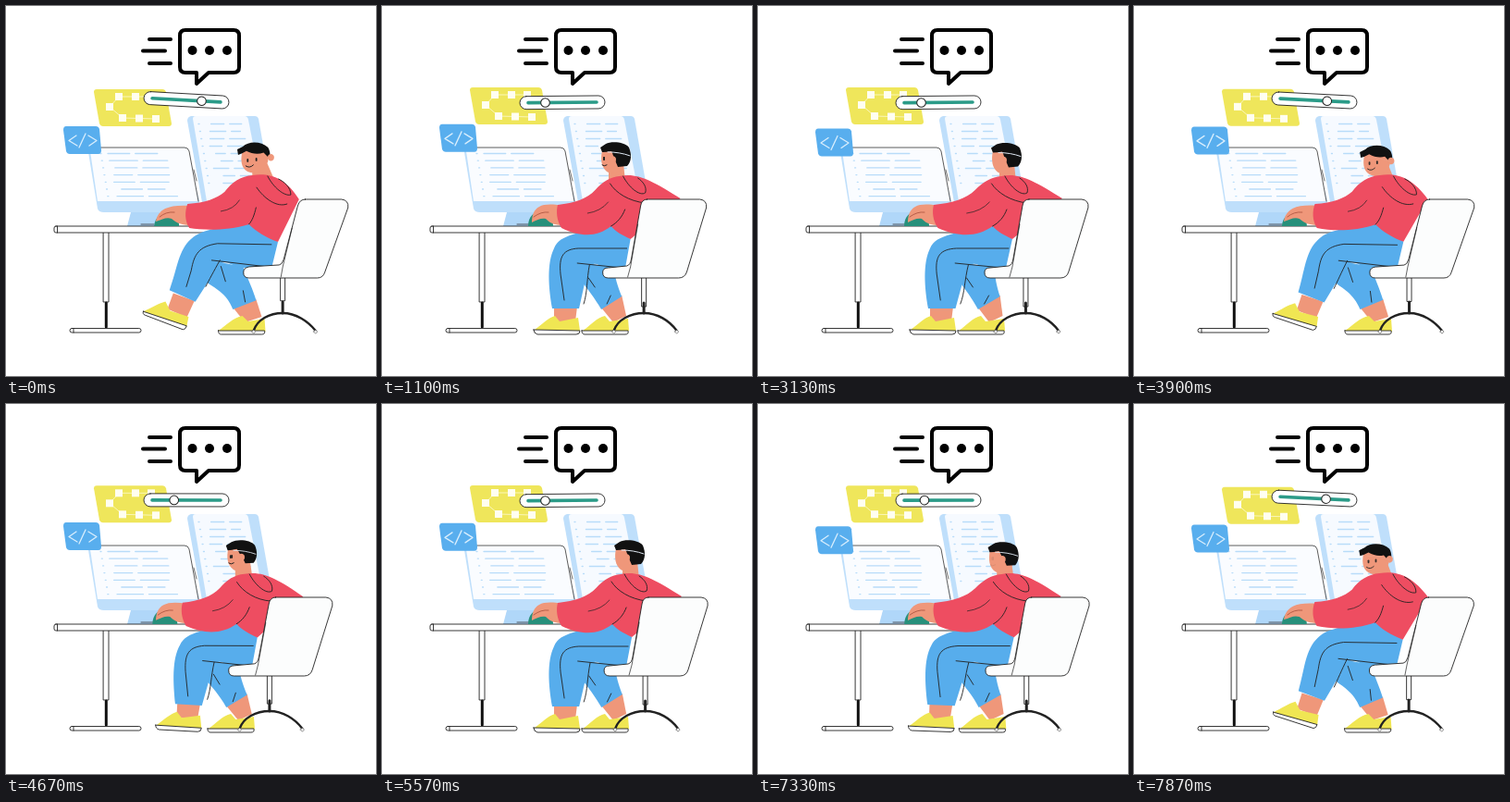
Recreate the animation shown at these times as an HTML page. Size 400 by 400 pixels, loop 7.91 s.

```html
<!DOCTYPE html>
<html lang="en">
<head>
<meta charset="utf-8">
<title>Coder at a desk</title>
<style>
html, body { margin: 0; width: 100%; height: 100%; overflow: hidden; background: #fff; }
svg { display: block; width: 100vw; height: 100vh; }
</style>
</head>
<body>
<svg id="stage" viewBox="0 0 400 400" fill="none" stroke-linecap="round" stroke-linejoin="round">
  <g stroke="#000" stroke-width="4">
    <path d="M155,36H178M148,48.500H172M155,62H178"/>
    <path d="M206,72H194Q188,72 188,66V32Q188,26 194,26H246Q252,26 252,32V66Q252,72 246,72H219L206,84Z"/>
    <g fill="#000" stroke="none"><circle cx="201.500" cy="48" r="5"/><circle cx="220" cy="48" r="5"/><circle cx="239" cy="48" r="5"/></g>
  </g>

  <g id="rightScreen">
    <path fill="#bfdffb" d="M200,119H269Q272,119 273,122L285,190L270,212H212L196,124Q196,120 200,119Z"/>
    <path fill="#f6faff" d="M202,122Q202,119 205,119H258Q261,119 262,123L275,190L270,211H217Z"/>
    <path stroke="#333" stroke-width=".7" d="M203,177L206,189"/>
  </g>
  <g id="leftScreen">
    <path fill="#bfdffb" d="M92,153H194L209,211Q210,223 204,223H106Q100,223 99,219L89,158Q89,154 92,153Z"/>
    <path fill="#fafcff" d="M92,153H193Q197,153 198,157L208,211H99L91,157Z"/>
    <path stroke="#333" stroke-width=".8" d="M93,153H193Q197,153 198,157L208,211"/>
    <path fill="#b0d7f9" d="M135,223H166L168,238H131Z"/>
    <path stroke="#333" stroke-width=".8" d="M146,236H160"/>
  </g>
  <g id="code" stroke="#b8dcf9" stroke-width="1.300"></g>

  <g id="flow">
    <path fill="#efe65b" d="M98,90H169Q172,90 173,93L179,127Q179,130 176,130H105Q102,130 101,127L95,93Q95,90 98,90Z"/>
    <path stroke="#fbf7b8" stroke-width="1" d="M157,98H122L112,109L126,121L162,122"/>
    <g id="nodes" fill="#fffef0"></g>
  </g>
  <g id="slider">
    <rect x="-46" y="-7" width="92" height="14" rx="7" fill="#fff" stroke="#222" stroke-width=".9"/>
    <path stroke="#2b9b88" stroke-width="3.600" d="M-37,0H37"/>
    <circle id="knob" r="4.800" fill="#fff" stroke="#222"/>
  </g>
  <g id="tag">
    <path fill="#58aeee" d="M65,130H97Q100,130 101,133L103,156Q103,160 100,160H69Q66,160 65,157L62,134Q62,130 65,130Z"/>
    <path stroke="#d9eefd" stroke-width="1.300" d="M76,140L68,145.500L77,151M86,138L79,153M89,140L98,145.500L90,151"/>
  </g>

  <g stroke="#222" stroke-width=".9" fill="#fff">
    <rect x="105.500" y="244" width="5.500" height="76"/>
    <path stroke="#111" stroke-width="3" d="M108.300,321V347"/>
    <rect x="69" y="348.500" width="77" height="4.500" rx="2.200"/>
    <path d="M73,348.500V353"/>
    <rect x="52" y="238" width="203" height="7" rx="2"/>
    <path d="M55.500,238V245"/>
  </g>
  <g id="person"></g>
</svg>
<script>
const NS = 'http://www.w3.org/2000/svg';
const $ = id => document.getElementById(id);
const LOOP = 7910, CYCLE = 4000;
const RED = '#ee4d61', BLUE = '#57adec', SKIN = '#ef977a', HAIR = '#111', LEMON = '#f0e653';

function add(parent, tag, attrs) {
  const el = parent.appendChild(document.createElementNS(NS, tag));
  for (const k in attrs) el.setAttribute(k, attrs[k]);
  return el;
}

const clamp = (v, lo = 0, hi = 1) => Math.min(hi, Math.max(lo, v));
const ease = p => p * p * (3 - 2 * p);
const lerp = (a, b, p) => a + (b - a) * p;
const span = (t, from, to) => ease(clamp((t - from) / (to - from)));

// Smooth periodic curve through [time, value] points
function curve(keys) {
  const n = keys.length;
  const at = i => {
    const [t, v] = keys[(i + n) % n];
    return [t + CYCLE * Math.floor(i / n), v];
  };
  return t => {
    let i = n - 1;
    while (i > 0 && keys[i][0] > t) i--;
    const [a, b, c, e] = [at(i - 1), at(i), at(i + 1), at(i + 2)];
    const h = c[0] - b[0], p = (t - b[0]) / h;
    const m0 = (c[1] - a[1]) / (c[0] - a[0]) * h;
    const m1 = (e[1] - b[1]) / (e[0] - b[0]) * h;
    return lerp(b[1], c[1], ease(p)) + p * (1 - p) * ((1 - p) * m0 - p * m1);
  };
}

const headX = curve([[0, 268], [150, 270], [800, 252], [1100, 253], [1570, 268], [2230, 277], [2670, 274], [3200, 268], [3700, 259], [3900, 262]]);
const headY = curve([[0, 165], [800, 162], [1570, 162], [2230, 160], [2670, 160.5], [3200, 163], [3700, 168], [3900, 168]]);

const PAIR = /(-?[\d.]+),(-?[\d.]+)/g;
const pairs = d => [...d.matchAll(PAIR)].map(m => [+m[1], +m[2]]);

// A part blends from its upright pose to its reclined pose
const parts = [];
function part(group, upright, reclined, style, bend) {
  const a = pairs(upright), b = pairs(reclined);
  const el = add(group, 'path', style);
  parts.push((u, drift) => {
    let i = 0;
    el.setAttribute('d', upright.replace(PAIR, () => {
      const x = lerp(a[i][0], b[i][0], u), y = lerp(a[i][1], b[i][1], u);
      i++;
      return (x + drift * bend(x, y)).toFixed(2) + ',' + y.toFixed(2);
    }));
  });
  return el;
}
const soft = (x, y) => clamp((x - 190) / 60) * clamp((340 - y) / 70);
const whole = () => 1;
const fixed = () => 0;
const ink = (w = 0.9) => ({ stroke: '#222', 'stroke-width': w });
const fill = c => ({ fill: c });

const body = $('person');
const layer = () => add(body, 'g', {});
const [head, mouse, legs, torso, chair] = [layer(), layer(), layer(), layer(), layer()];

// Head, around its own centre
part(head, 'M-8,8 L8,8 L10,28 L-8,28Z', 'M-2,8 L14,5 L22,24 L-2,24Z', fill(SKIN), fixed);
part(head, 'M-15,-6 C-17,4 -16,12 -10,17 C-4,21 4,18 8,12 L8,-8 L-13,-8Z',
  'M-13,-6 C-15,4 -13,13 -4,15 C4,17 12,12 15,3 L15,-8 L-12,-8Z', fill(SKIN), fixed);
part(head, 'M-17,-9 L-11,-13 C-5,-16 10,-15 14,-9 C17,-2 17,6 12,11 L2,12 L-1,5 C-3,2 -3,-2 -5,-5 Q-10,-4 -15,-4Z',
  'M-18,-10 L-12,-13 C-6,-19 8,-19 15,-12 C17,-9 18,-5 17,1 L14,-2 L10,-6 C4,-4 -2,-5 -8,-8 Q-13,-5 -17,-4Z', fill(HAIR), fixed);
part(head, 'M-7,4 C-7,-1 0,-1 0,4 C0,10 -7,10 -7,4Z', 'M14,-1 C14,-6 21,-6 21,-1 C21,4 14,4 14,-1Z', fill(SKIN), fixed);
const strap = part(head, 'M-9,-4 Q4,-4 15,0', 'M-9,-4 Q4,-4 15,0', { stroke: '#dfe8f2', 'stroke-width': 1 }, fixed);
const face = add(head, 'g', {});
part(face, 'M-13,2 L-13,4', 'M-7,1 L-7,3', ink(1.8), fixed);
part(face, 'M-13,2 L-13,4', 'M2,0 L2,2', ink(1.8), fixed);
part(face, 'M-15,10 Q-13,12 -10,10', 'M-9,8 Q-5,11 -1,7', ink(1), fixed);

// Mouse
part(mouse, 'M158,238 C158,226 166,221 174,222 C182,223 185,230 185,238Z',
  'M160,238 C161,227 169,222 177,223 C184,224 187,231 187,238Z', fill('#27907b'), fixed);

// Legs and shoes
part(legs, 'M236,325 L259,313 L264,335 L250,342Z', 'M245,326 L270,317 L276,336 L258,342Z', fill(SKIN), soft);
part(legs, 'M217,351 C226,345 232,337 241,335 L246,341 L266,338 L267,351Z',
  'M229,351 C238,345 245,337 255,335 L261,341 L279,338 L280,352Z', fill(LEMON), fixed);
part(legs, 'M216,351 L266,351 Q267,355 263,355 L219,355 Q216,355 216,351Z',
  'M229,351 L279,351 Q280,355 276,355 L232,355 Q229,355 229,351Z', { ...ink(), fill: '#fff' }, fixed);
part(legs, 'M222,278 L250,283 C252,295 254,302 259,314 L237,328 C230,316 222,306 216,298Z',
  'M222,275 L256,282 C262,297 266,305 270,318 L245,328 C238,310 225,305 216,298Z', fill(BLUE), soft);
part(legs, 'M186,325 L211,325 L209,341 L186,341Z', 'M181,311 L204,319 L196,337 L175,328Z', fill(SKIN), fixed);
part(legs, 'M165,350 C173,344 180,337 187,335 L192,341 L212,337 L214,351Z',
  'M149,331 C158,327 165,322 173,320 L178,330 L198,336 L196,347Z', fill(LEMON), fixed);
part(legs, 'M164,350 L214,351 Q214,355 210,355 L168,355 Q164,354 164,350Z',
  'M149,331 L196,346 Q195,350 192,350 L151,335 Q148,334 149,331Z', { ...ink(), fill: '#fff' }, fixed);
part(legs, 'M268,252 L262,286 L240,284 C228,274 223,280 221,290 L213,327 L184,327 C180,305 178,278 186,262 C192,246 215,246 247,236Z',
  'M293,255 L286,284 L250,283 C240,276 233,276 230,280 L205,320 L177,308 C185,285 186,264 200,252 C212,240 235,240 262,234Z', fill(BLUE), soft);
part(legs, 'M264,262 L212,262 C196,263 191,270 193,290 L197,318',
  'M286,258 L228,257 C208,260 203,268 200,286 L195,304', ink(), soft);
part(legs, 'M211,278 L258,283', 'M222,275 L282,282', ink(), soft);
part(legs, 'M224,280 C221,296 222,310 218,322', 'M231,275 C224,288 220,296 216,304', ink(), soft);
part(legs, 'M223,294 L230,304', 'M232,282 L237,298', ink(), soft);
part(legs, 'M247,313 L243,322', 'M256,308 L258,320', ink(), soft);

// Hand and hoodie
part(torso, 'M194,216 C185,214 175,214 170,217 C164,220 162,227 162,234 C168,231 172,229 177,230 C183,236 188,237 196,237Z',
  'M199,216 C188,215 178,216 172,219 C166,222 163,227 162,233 C169,231 173,228 179,230 C185,235 190,237 200,237Z', fill(SKIN), fixed);
part(torso, 'M164,228 Q172,222 180,223', 'M166,228 Q173,222 182,223', { stroke: '#a9503d', 'stroke-width': 0.8 }, fixed);
part(torso, 'M190,215 C208,213 222,208 230,199 C238,190 246,185 256,184 C275,180 290,188 322,208 L268,252 C258,247 252,244 247,238 C232,250 215,250 194,240 C189,232 188,222 190,215Z',
  'M196,214 C215,213 228,208 236,201 C244,190 254,184 266,183 C285,180 302,186 317,209 L293,255 C280,250 270,244 262,236 C240,243 215,243 198,240 C193,232 193,222 196,214Z', fill(RED), soft);
part(torso, 'M246,192 C252,202 266,211 284,213', 'M270,196 C278,208 292,218 303,214', ink(), soft);
part(torso, 'M260,184 C266,196 278,206 284,202 C286,196 282,190 276,186', 'M282,184 C288,196 300,206 307,204 C307,196 300,190 294,187', ink(), soft);
part(torso, 'M247,238 C254,234 259,228 262,220', 'M262,236 C266,232 268,226 270,218', ink(), soft);
part(torso, 'M222,224 Q236,222 244,212', 'M232,222 Q246,220 252,210', ink(0.7), soft);

// Chair
part(chair, 'M280,294 L280,325 L285,325 L285,294Z', 'M296,294 L296,319 L301,319 L301,294Z', { ...ink(), fill: '#fff' }, whole);
part(chair, 'M282.5,321 L282.5,332', 'M298.5,320 L298.5,332', ink(3), whole);
part(chair, 'M250,351 C254,339 268,332 282.5,332 C297,332 310,340 318,351', 'M267,351 C271,339 284,332 298.5,332 C313,332 326,341 334,351', ink(2.4), whole);
for (const [a, b] of [[250, 267], [318, 334]]) {
  const dot = x => `M${x - 2},352 Q${x},349 ${x + 2},352 Q${x},356 ${x - 2},352Z`;
  part(chair, dot(a), dot(b), { fill: '#fff', stroke: '#777', 'stroke-width': 0.8 }, whole);
}
part(chair, 'M286,209 L343,209 Q351,210 350,218 L329,287 Q327,294 320,294 L244,294 Q238,294 238,288 Q238,283 244,283 L264,281 Q268,280 269,273 L279,216 Q280,209 286,209Z',
  'M322,209 L362,209 Q370,210 369,218 L344,288 Q342,294 336,294 L262,294 Q256,294 256,288 Q256,283 262,282 L294,280 Q297,280 299,274 L314,216 Q316,209 322,209Z',
  { ...ink(), fill: '#fcfdfd' }, whole);
part(chair, 'M276,236 L268,282 L265,293', 'M308,240 L298,282 L296,293', ink(0.7), whole);

// Flow nodes and code lines
for (const [x, y] of [[122, 98], [140, 98], [157, 98], [112, 109], [126, 121], [144, 121.5], [162, 122]])
  add($('nodes'), 'rect', { x: x - 4, y: y - 4, width: 8, height: 8 });

let seed = 11;
const rand = () => (seed = seed * 16807 % 2147483647) / 2147483647;
function codeRows(x0, y0, step, rows, slant, width) {
  for (let i = 0; i < rows; i++) {
    const y = y0 + i * step, x = x0 + slant * (y - y0);
    const start = x + 8 + rand() * 10, mid = start + width * (0.2 + rand() * 0.2);
    const end = Math.min(x + width, mid + 6 + width * (0.2 + rand() * 0.3));
    add($('code'), 'path', { d: `M${x},${y}h1M${start},${y}H${mid}M${mid + 6},${y}H${end}` });
  }
}
codeRows(102, 159.5, 7.7, 7, 0.17, 82);
codeRows(208, 127.5, 8, 9, 0.17, 48);

function draw(t) {
  const recline = 1.04 * (t < 850 ? 1 - span(t, 100, 850) : span(t, 3150, 4100));
  const drift = t < 3150 ? 7 * clamp((t - 900) / 2250) : 7 * (1 - span(t, 3150, 4000));
  for (const update of parts) update(recline, drift);

  const turn = clamp(recline);
  head.setAttribute('transform', `translate(${headX(t)} ${headY(t)})`);
  strap.setAttribute('opacity', 1 - turn);
  face.setAttribute('opacity', Math.max(turn, 1 - span(t, 1200, 1550)));

  const sway = Math.sin((t - 1950) / CYCLE * 2 * Math.PI);
  $('tag').setAttribute('transform', `translate(0 ${0.2 + 2.4 * sway})`);
  $('flow').setAttribute('transform', `translate(0 ${-2 * (1 - turn)})`);
  $('slider').setAttribute('transform',
    `translate(195 ${lerp(104.3, 101.8, turn)}) rotate(${lerp(-0.5, 3.2, turn)})`);
  $('knob').setAttribute('cx', lerp(-18.5, 16.5, turn));
}

const begin = performance.now();
function frame() {
  draw((performance.now() - begin) % LOOP % CYCLE);
  requestAnimationFrame(frame);
}
frame();
</script>
</body>
</html>
```
